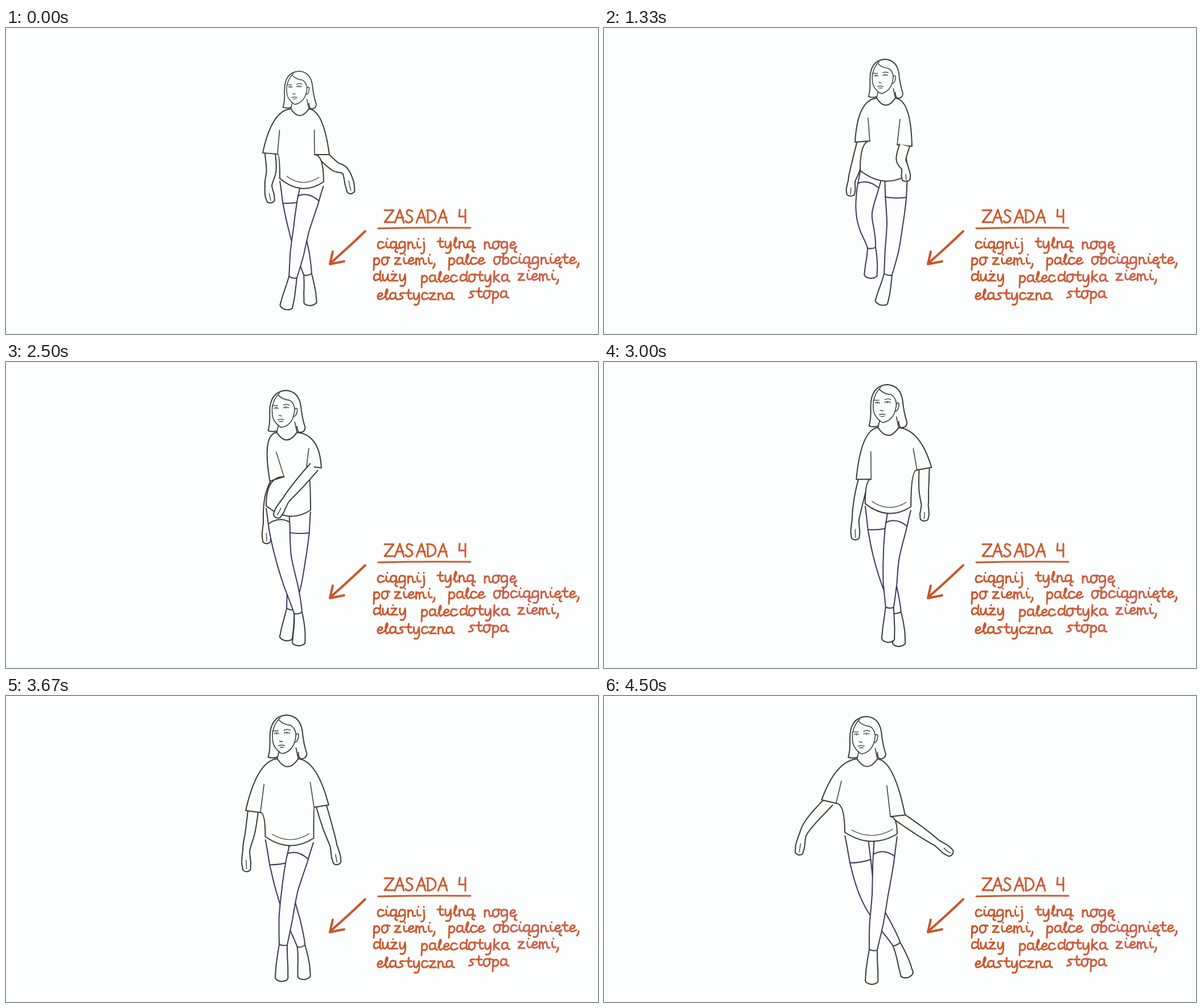
Write an HTML page with a canvas that moves like this. It is 1040 px wide and 539 px high and loops after 4.67 s.

```html
<!DOCTYPE html>
<html lang="pl">
<head>
<meta charset="utf-8">
<title>Zasada 4</title>
<style>
  html, body { margin: 0; height: 100%; overflow: hidden; background: #fcfdfd; }
  canvas { display: block; }
</style>
</head>
<body>
<canvas id="stage" width="1040" height="539" role="img" aria-label="ZASADA 4: ciągnij tylną nogę po ziemi, palce obciągnięte, duży palec dotyka ziemi, elastyczna stopa"></canvas>
<script>
const ctx = document.getElementById('stage').getContext('2d');
const PAPER = '#fcfdfd', LOOP = 4670, STEPS = 28;
const clamp = (v, lo, hi) => Math.min(hi, Math.max(lo, v));
const mix = (a, b, u) => a + (b - a) * u;

// ---- handwriting: letters share a few pen strokes, baseline at y = 0
const bowl = 'M11-11Q2-16 1-6Q2 2 10-4', foot = 'M11-12Q10 0 15-1';
const loop = 'M11-12Q14 12 3 8', cup = 'M2-12Q1 0 6-1Q10-3 11-12';
const tall = 'M3-19L2 0', round = 'M2-7Q8-16 12-8Q12 2 3-1';
const dot = 'M5-18v.5', ogonek = 'M11-1Q7 5 13 6';
const e = 'M2-6Q11-6 10-11Q5-15 2-7Q1 3 13-4', z = 'M2-12H11L2-1H13';
const glyphs = {
  a: bowl + foot, ą: bowl + foot + ogonek, b: tall + round,
  c: 'M11-11Q2-16 1-6Q2 3 13-4', d: bowl + 'M13-18Q10 1 15-1',
  e, ę: e + ogonek, g: bowl + loop,
  i: 'M3-12Q2 1 9-3' + dot, j: 'M5-12Q8 11 0 8' + dot,
  k: tall + 'M11-13L3-7L12 0', l: 'M1-5Q9-17 5-19Q1-12 4-2Q5 1 9-3',
  m: 'M2-12V0M2-8Q8-17 8 0M8-8Q15-17 15-4Q16 0 20-2',
  n: 'M2-12V0M2-8Q10-17 10-4Q10 0 15-2',
  o: 'M8-13Q1-14 1-6Q2 1 7 0Q14-4 11-11Q8-15 15-12',
  p: 'M3-12L2 9' + round, s: 'M11-12Q3-13 4-9Q14-2 1-1',
  t: 'M6-18Q3 3 12-3M1-12H11', u: cup + foot, y: cup + loop,
  z, ż: z + dot, ',': 'M4-2Q4 3 1 6',
  Z: 'M2-22H18L2-1H18', A: 'M1 0L10-23L17 0M4-9H16', D: 'M2-22V0Q16-2 16-12Q14-24 0-22',
  S: 'M13-20Q4-26 3-18Q3-14 9-12Q17-5 9-1Q4 1 1-3', 4: 'M3-23L2-11H13M13-23V0'
};
function advance(ch) {
  if (ch === 'm') return 21;
  if (ch === ',') return 7;
  if ('ijl'.includes(ch)) return 9.5;
  if ('ceęst'.includes(ch)) return 13;
  return 'ZASD'.includes(ch) ? 19 : 15;
}
const ink = new Path2D('M654 353Q730 351 816 352');
function write(word, x, y) {
  for (const ch of word) {
    ink.addPath(new Path2D(glyphs[ch]), new DOMMatrix([1, 0, 0, 1, x, y]));
    x += advance(ch);
  }
}
write('ZASADA', 663, 343); write('4', 794, 343);
write('ciągnij', 652, 389); write('tylną', 757, 388); write('nogę', 839, 389);
write('po', 644, 417); write('ziemi,', 681, 417); write('palce', 776, 417); write('obciągnięte,', 856, 416);
write('duży', 645, 446); write('palec', 728, 448); write('dotyka', 797, 447); write('ziemi,', 898, 445);
write('elastyczna', 651, 479); write('stopa', 812, 476);
const arrow = new Path2D('M631 358Q602 386 569 415M574 394L569 416L594 411');

// ---- key poses: head (crown and size), then four joints for each limb
// arm: sleeve hem, elbow, wrist, fingertip; leg: hip, knee, ankle, toe
const keys = [];
function pose(frame, ...parts) {
  const [head, armL, armR, legL, legR] = parts.map(s => s.split(/[ ,]/).map(Number));
  keys.push({ frame, parts: { head, armL, armR, legL, legR } });
}
pose(0, '515,76,.86',
  '464,221 466,251 461,278 466,308', '555,223 577,243 597,254 607,292',
  '501,268 511,355 530,434 535,489', '538,274 519,354 504,439 491,496');
pose(4, '502,69,.88',
  '440,211 430,240 416,268 412,295', '545,223 578,230 612,233 634,251',
  '483,260 497,367 519,430 535,481', '524,260 515,350 502,439 489,492');
pose(8, '494,55,.89',
  '454,200 442,246 435,270 433,296', '528,207 522,231 529,248 531,270',
  '470,254 457,325 470,387 468,441', '513,262 511,345 499,434 486,488');
pose(15, '492,50,.96',
  '476,206 463,240 458,285 458,320', '541,185 515,215 491,244 474,274',
  '477,256 487,342 513,442 514,500', '515,264 512,348 500,435 491,491');
pose(20, '502,33,1',
  '443,207 438,241 431,275 431,309', '577,190 593,230 612,258 621,284',
  '480,250 490,350 516,441 521,502', '522,254 500,340 503,430 504,496');
pose(24, '485,34,1',
  '425,200 420,237 413,271 415,310', '531,198 537,232 539,270 544,310',
  '471,251 492,350 521,440 527,497', '519,253 497,345 471,446 464,510');
pose(27, '461,36,.97',
  '395,186 364,220 349,245 342,280', '516,211 555,238 585,259 612,279',
  '443,243 464,350 514,437 534,496', '495,246 485,350 473,447 470,508');

function poseAt(frame) {
  const i = Math.max(1, keys.findIndex(k => k.frame >= frame));
  const a = keys[i - 1], b = keys[i];
  const u = (frame - a.frame) / (b.frame - a.frame), out = {};
  for (const k in a.parts) out[k] = a.parts[k].map((v, j) => mix(v, b.parts[k][j], u));
  return out;
}

// ---- limbs: a smooth centre line through the joints, widened by a profile
function centre(p, t) {
  t = clamp(t, 0, 3);
  const i = Math.min(2, Math.floor(t)), u = t - i;
  return [0, 1].map(c => {
    const [a, b, d, f] = [-1, 0, 1, 2].map(k => p[2 * clamp(i + k, 0, 3) + c]);
    return b + u / 2 * (d - a + u * (2 * a - 5 * b + 4 * d - f + u * (3 * b - a - 3 * d + f)));
  });
}

function edge(p, widths, t, side) {
  const [x, y] = centre(p, t), [x0, y0] = centre(p, t - .1), [x1, y1] = centre(p, t + .1);
  const k = Math.min(5, Math.floor(t * 2));
  const cap = Math.sqrt(clamp((3 - t) * 7, 0, 1));
  const w = side * cap * mix(widths[k], widths[k + 1], t * 2 - k) / Math.hypot(x1 - x0, y1 - y0);
  return [x - (y1 - y0) * w, y + (x1 - x0) * w];
}

function limb(p, widths, color) {
  const n = 75;
  ctx.beginPath();
  for (let i = 0; i <= 2 * n; i++) {
    const t = 3 * (i > n ? 2 * n - i : i) / n;
    ctx.lineTo(...edge(p, widths, t, i > n ? -1 : 1));
  }
  paint(color);
}

function paint(color) {
  ctx.fillStyle = PAPER;
  ctx.strokeStyle = color;
  ctx.lineWidth = 2;
  ctx.fill();
  ctx.stroke();
}

function line([x0, y0], [x1, y1], bend = 0) {
  ctx.beginPath();
  ctx.moveTo(x0, y0);
  ctx.quadraticCurveTo((x0 + x1) / 2, (y0 + y1) / 2 + bend, x1, y1);
  ctx.stroke();
}

// half widths at every half joint
const ARM = [9, 9, 8.5, 7.5, 6, 8, 6], LEG = [20, 18.5, 14, 12, 7, 10.5, 11.5];

const legInk = ctx.createLinearGradient(0, 250, 0, 500);
['#3a3a4c', '#38386a', '#3c3c5c', '#383830'].forEach((c, i) => legInk.addColorStop(i / 3, c));

function leg(p, leads) {
  limb(p, LEG, legInk);
  const across = (t, bend) => line(edge(p, LEG, t, 1), edge(p, LEG, t, -1), bend);
  across(leads ? .4 : .5, leads ? -12 : 3);
  across(2, 3);
}

function arm(p) {
  limb(p, ARM, '#3a3a36');
  ctx.lineWidth = 1.3;
  line(centre(p, 2.4), centre(p, 2.8), 2);
}

// the shirt hangs from the head and hips; sleeves follow the arms
function shirt({ head: [x, y, s], armL, armR, legL, legR }, fold) {
  const twist = ((armL[0] + armR[0]) / 2 - x) / 2;
  const half = (side, a, hip) => {
    const shoulder = [x + twist + side * 49 * s, y + 87 * s];
    const dx = a[0] - shoulder[0], dy = a[1] - shoulder[1], k = side * 13 / Math.hypot(dx, dy);
    const inner = [a[0] - dy * k, a[1] + dx * k];
    return {
      collar: [x + (side > 0 ? 20 : -17) * s, y + 77 * s],
      bend: [x + twist + side * 53 * s, y + 81 * s],
      outer: [a[0] + dy * k, a[1] - dx * k],
      inner,
      armpit: [inner[0] - dx * .6, inner[1] - dy * .6],
      hem: [hip[0] + side * 20, hip[1] - 3]
    };
  };
  const l = half(-1, armL, legL), r = half(1, armR, legR);
  const curve = (c, to) => ctx.quadraticCurveTo(...c, ...to);

  ctx.beginPath();
  ctx.moveTo(...l.collar);
  curve(l.bend, l.outer);
  ctx.lineTo(...l.inner);
  curve([l.hem[0], l.inner[1]], l.hem);
  curve([(l.hem[0] + r.hem[0]) / 2, (l.hem[1] + r.hem[1]) / 2 + 29], r.hem);
  curve([r.hem[0], r.inner[1]], r.inner);
  ctx.lineTo(...r.outer);
  curve(r.bend, r.collar);
  curve([x + s, y + 105 * s], l.collar);
  paint('#3b3b34');

  ctx.lineWidth = 1.5;
  line(l.inner, l.armpit);
  line(r.inner, r.armpit);
  ctx.lineWidth = 1.2;
  if (fold) line([l.hem[0] + 12, l.hem[1] - 4], [r.hem[0] - 8, r.hem[1] - 8], 20);
}

const hair = new Path2D('M-17 74Q-24 77-33 74Q-29 62-30 40Q-30 2 0 0Q23 2 27 28Q29 50 35 68Q34 78 24 77Q20 74 20 66');
const face = new Path2D('M-12 5Q-22 14-25 30M-14 9Q-6 17 6 18Q15 22 16 36M-25 28Q-27 46-22 55Q-14 67-8 68Q4 66 11 54Q15 46 16 34Q22 30 20 40Q18 48 14 48');
const features = new Path2D('M-22 33Q-18 30-14 33M-5 32Q0 29 5 32M-18 33v1M0 32v1M-23 28L-15 28M-5 27Q1 24 6 27M-13 46L-8 47M-15 54Q-9 52-4 54M-12 57L-6 57');

function head([x, y, s]) {
  ctx.save();
  ctx.translate(x, y);
  ctx.scale(s, s);
  ctx.strokeStyle = '#3a3a3e';
  ctx.lineWidth = 1.7;
  line([-14, 64], [-17, 77], 1);
  line([16, 58], [20, 77], 1);
  ctx.lineWidth = 2;
  ctx.stroke(hair);
  ctx.lineWidth = 1.6;
  ctx.stroke(face);
  ctx.lineWidth = 1.4;
  ctx.stroke(features);
  ctx.restore();
}

const orange = ctx.createLinearGradient(650, 0, 1010, 0);
['#c9552c', '#cd5c30', '#cd5b38', '#cf6050', '#cc5b32'].forEach((c, i) => orange.addColorStop(i / 4, c));

function draw(now) {
  const frame = Math.min(STEPS - 1, Math.floor((now % LOOP + 10) * STEPS / LOOP));
  const p = poseAt(frame);
  const leftLeads = frame > 4 && frame < 18;
  const armInFront = frame > 6 && frame < 18;

  ctx.fillStyle = PAPER;
  ctx.fillRect(0, 0, 1040, 539);
  ctx.lineCap = ctx.lineJoin = 'round';

  arm(p.armL);
  if (!armInFront) arm(p.armR);
  leg(leftLeads ? p.legR : p.legL, false);
  leg(leftLeads ? p.legL : p.legR, true);
  shirt(p, !leftLeads);
  if (armInFront) arm(p.armR);
  head(p.head);

  ctx.strokeStyle = orange;
  ctx.lineWidth = 3;
  ctx.stroke(ink);
  ctx.lineWidth = 4;
  ctx.stroke(arrow);
}

const start = performance.now();
function tick() {
  draw(performance.now() - start);
  requestAnimationFrame(tick);
}
tick();
</script>
</body>
</html>
```
